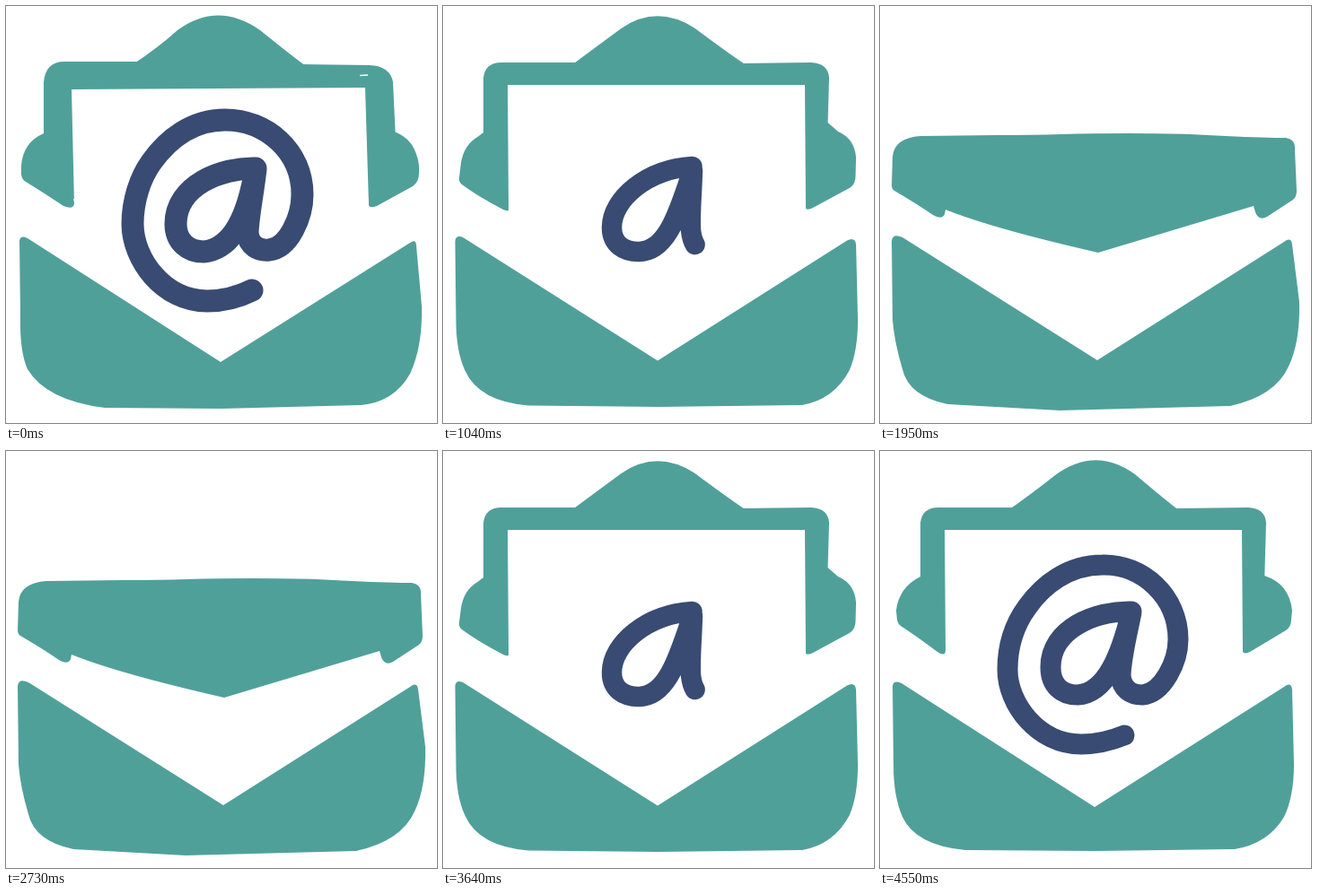
These frames come from a looping animation (480x465 px, 4680 ms). An HTML page:

```html
<!DOCTYPE html>
<html lang="en">
<head>
<meta charset="utf-8">
<title>Envelope</title>
<style>
  html, body { margin: 0; width: 100%; height: 100%; overflow: hidden; background: #fff; }
  svg { display: block; width: 480px; height: 465px; fill: #50a09a; }
  #at { fill: none; stroke: #394b73; stroke-linecap: round; stroke-linejoin: round; }
</style>
</head>
<body>
<svg viewBox="0 0 480 465">
  <path id="flap"/>
  <g id="letter">
    <path id="border"/>
    <path id="paper" fill="#fff"/>
    <path id="nick" d="M394 77.5L403 77" stroke="#fff" stroke-width="1.5"/>
    <path id="at"/>
  </g>
  <path id="front"/>
</svg>
<script>
const STEP = 130, STEPS = 36;

// Each part maps a step to a pose; step 0 is open, step 18 closed.
const openFlap = 'M23 195Q40 206 64 224Q73 230 73 222L73 215Q160 214 240 214L403 213L403 221Q404 228 412 224L452 200Q458 196 458 188L459 178Q456 148 428 139Q400 120 385 91L340 71Q330 65 284 26Q240 -6 195 27Q170 47 140 68L45 140Q21 152 18 178L19 188Q20 193 23 195Z';
const flap = {
  0: 'M22 196Q40 207 64 223Q76 228 76 219L75 215Q160 214 240 214L403 213L404 218Q402 227 413 223L453 201Q460 196 460 186L460 178Q456 148 432 140Q400 120 385 91L340 71Q330 65 283 27Q236 -6 191 27Q170 46 140 66L42 142Q19 152 17 178L17 188Q18 194 22 196Z',
  1: openFlap,
  5: openFlap,
  11: 'M19 203Q35 217 70 230Q80 232 79 222L80 215Q160 214 240 214L400 213L402 224Q404 231 412 226L455 205Q461 201 461 190L461 160Q461 148 452 141Q425 114 385 91L345 67Q320 51 276 23Q236 2 202 23Q170 45 130 76L32 152Q25 158 22 173L17 195Q15 200 19 203Z',
  15: 'M16 206Q40 220 59 233Q69 239 72 232L73 227Q125 248 243 275L416 223L418 230Q422 240 431 235L460 216Q464 213 464 206L462 160Q463 149 452 147Q430 147 385 145L345 143Q320 142 276 142Q236 142 202 143Q170 144 130 144L45 145Q16 147 14 168L13 200Q13 204 16 206Z',
  17: 'M16 206Q40 220 59 233Q62 235 66 237L73 241Q150 290 243 345L416 241L420 239Q424 237 431 233L460 216Q464 213 464 206L462 160Q463 149 452 147Q430 147 385 145L345 143Q320 142 276 142Q236 142 202 143Q170 144 130 144L45 145Q16 147 14 168L13 200Q13 204 16 206Z'
};

const front = {
  0: 'M15 262Q16 255 24 259L239 397L450 264Q457 259 457 268L463 335Q464 380 450 410Q432 442 395 445L240 449L110 448Q45 440 24 405Q15 385 16 345Z',
  1: 'M14 262Q15 255 24 259L239 397L450 263Q458 257 459 266L461 350Q461 385 450 408Q432 438 395 444L240 446L95 445Q40 440 25 408Q15 385 15 350Z',
  5: 'M14 262Q15 255 24 259L239 396L450 262Q459 257 460 266L462 350Q461 385 450 408Q432 438 395 444L240 447L95 445Q40 440 25 408Q15 385 15 350Z',
  11: 'M13 262Q14 254 22 258L239 395L450 261Q459 257 460 266L462 350Q463 385 455 405Q438 440 405 446L240 447L95 446Q40 442 24 405Q14 385 14 350Z',
  15: 'M13 262Q14 253 25 258L242 395L450 263Q458 257 459 266L467 330Q468 375 455 402Q440 435 390 446L200 451L75 444Q32 435 25 405Q16 375 14 350Z'
};

const raisedBorder = 'M45 150L45 80Q47 63 65 63L145 63L330 64L410 63Q429 64 430 80L428 150Z';
const border = {
  0: 'M42 150L42 85Q44 62 65 62L145 62L330 65L405 66Q428 67 431 85L434 150Z',
  1: raisedBorder,
  8: raisedBorder,
  11: 'M45 195L45 192Q47 188 65 188L145 188L330 188L410 188Q429 188 430 192L428 195Z'
};

const raisedPaper = 'M72 88L403 88L404 222L404 300L72 300L73 222Z';
const paper = {
  0: 'M73 93L400 91L404 222L404 300L76 300L76 222Z',
  1: raisedPaper,
  8: raisedPaper,
  11: 'M80 215L400 213L402 222L402 300L80 300L80 222Z'
};

const writtenAt = 'M278 183C225 180 188 215 188 247C188 266 202 274 218 274C252 274 264 222 278 184C277 215 275 230 276 250C278 268 285 273 293 272C312 268 329 240 329 215C330 165 290 127 243 127C210 128 185 148 163 180C148 200 141 222 141 245C141 282 175 329 222 329C245 329 260 324 274 317';
const at = {
  0: 'M278 181C240 180 189 200 189 243C189 263 203 274 220 274C254 271 270 230 278 182C274 215 270 232 269 252C270 268 282 273 293 272C315 270 330 235 330 210C330 162 290 127 244 127C207 127 180 149 162 174C149 192 141 218 141 243C141 282 175 329 224 329C245 329 260 324 274 317',
  1: 'M280 179C240 178 190 198 190 241C190 262 203 272 220 272C252 270 268 228 280 180C274 210 269 228 268 250C269 266 280 272 292 272C315 270 332 235 332 210C332 162 292 126 248 127C209 127 181 150 164 174C150 193 142 218 142 244C142 282 176 327 224 327C245 327 260 322 272 317',
  5: writtenAt,
  11: writtenAt.replace('278 183C225 180', '277 175C230 184')
};
const atWidth = { 0: 25, 1: 23, 5: 24, 11: 21 };
const atDrop = { 0: 0, 8: 0, 11: 66 };
const inkLength = { 0: 999, 2: 999, 5: 687, 11: 43 };

// Blends the numbers of the two poses around a step.
function pose(keys, step) {
  const steps = Object.keys(keys).map(Number);
  const from = steps.findLast(k => k <= step);
  const to = steps.find(k => k >= step) ?? from;
  const mix = from === to ? 0 : (step - from) / (to - from);
  const number = /-?[\d.]+/g;
  const ends = String(keys[to]).match(number);
  let n = 0;
  return String(keys[from]).replace(number, v => +v + (ends[n++] - v) * mix);
}

const el = id => document.getElementById(id);
const set = (id, attrs) => Object.entries(attrs).forEach(([k, v]) => el(id).setAttribute(k, v));

function draw(step) {
  set('flap', { d: pose(flap, step) });
  set('front', { d: pose(front, step) });
  set('letter', { display: step > 11 ? 'none' : 'inline' });
  set('nick', { display: step ? 'none' : 'inline' });
  set('border', { d: pose(border, step) });
  set('paper', { d: pose(paper, step) });
  set('at', {
    d: pose(at, step),
    transform: `translate(0 ${pose(atDrop, step)})`,
    'stroke-width': pose(atWidth, step),
    'stroke-dasharray': `${pose(inkLength, step)} 2000`
  });
}

const start = performance.now();
function tick() {
  const step = Math.floor((performance.now() - start) / STEP) % STEPS;
  draw(Math.min(step, STEPS - step));
  requestAnimationFrame(tick);
}
tick();
</script>
</body>
</html>
```
